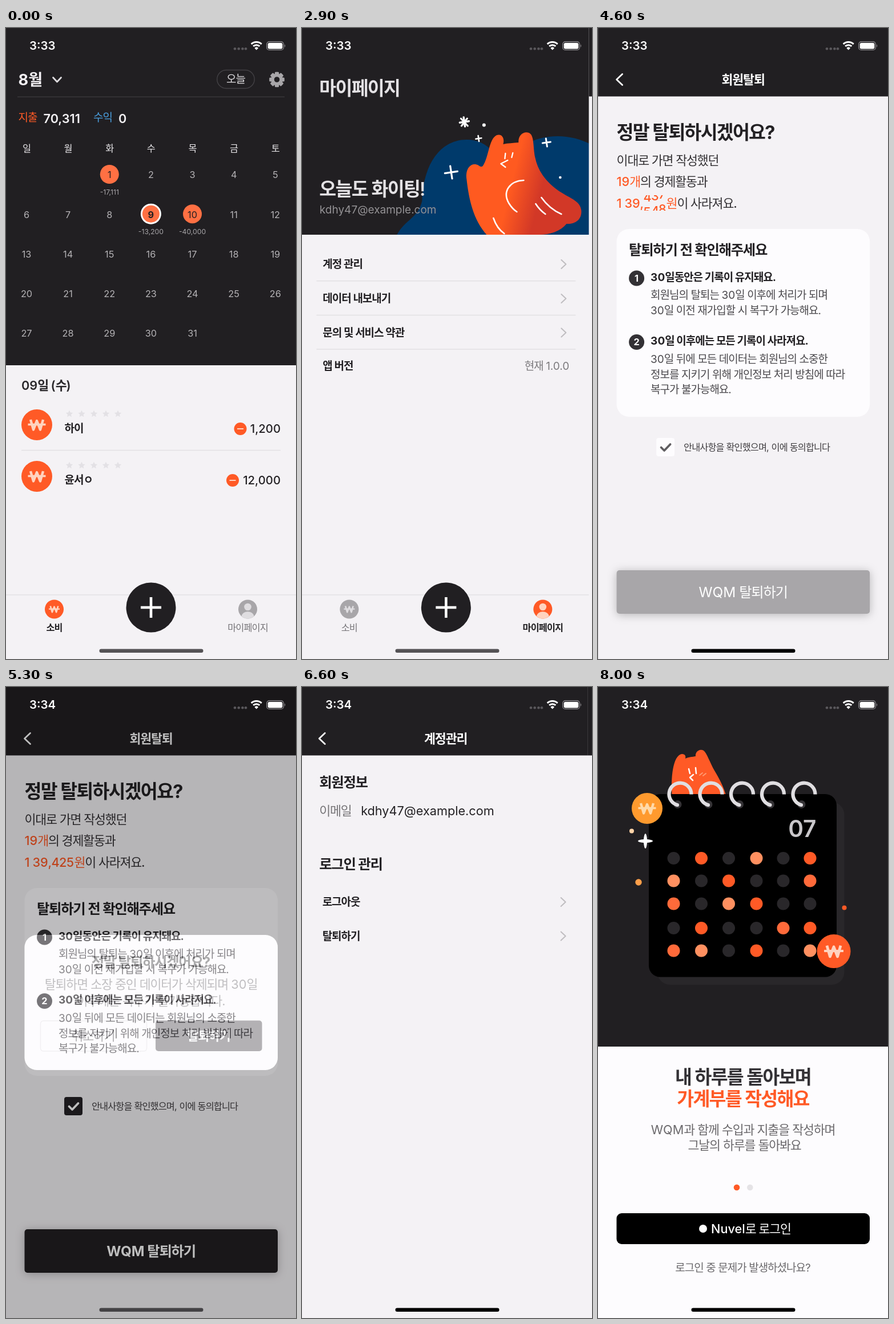
An HTML page for the animation above (8100 ms loop, 508x1102 px).

```html
<!DOCTYPE html>
<html lang="ko">
<head>
<meta charset="utf-8">
<title>가계부</title>
<style>
html, body { margin: 0; width: 100%; height: 100%; overflow: hidden; background: #211f22; }
svg { display: block; width: 100%; height: 100%; }
text { font-family: Inter, "Noto Sans CJK KR", sans-serif; word-spacing: -.042em; }
.k { letter-spacing: -.054em; }
.raised { filter: drop-shadow(0 2px 8px rgba(0, 0, 0, .25)); }
.line { fill: none; stroke-linecap: round; stroke-linejoin: round; }
</style>
</head>
<body>
<svg id="stage" viewBox="0 0 508 1102" xmlns="http://www.w3.org/2000/svg"></svg>
<script>
const LOOP = 8.1, W = 508, H = 1102;
const DARK = '#211f22', PAPER = '#f4f2f5', CARD = '#fdfcfe', ORANGE = '#ff5a26', PEACH = '#ffd3bf';
const GRAY = '#a8a6a9', RULE = '#e1dfe2', INK = '#232124', BODY = '#4b494d', LEAD = '#343235';
const EMAIL = 'kdhy47@example.com', APP = 'WQM';
// type scale
const XS = 12.2, S = 16.3, M = 19, L = 21.7, XL = 24.4, XXL = 32.5;

const each = (list, fn) => list.map(fn).join('');

// Text is placed by its vertical centre; Hangul is set a little tighter than Latin.
function text(x, cy, str, size, fill = INK, weight = 400, anchor = 'start') {
  const body = str.replace(/[가-힣ㄱ-ㅎ]+/g, '<tspan class="k">$&</tspan>');
  return `<text x="${x}" y="${cy + size * .365}" font-size="${size}" fill="${fill}" font-weight="${weight}" text-anchor="${anchor}">${body}</text>`;
}
const mid = (x, cy, str, size, fill, weight) => text(x, cy, str, size, fill, weight, 'middle');
const end = (x, cy, str, size, fill, weight) => text(x, cy, str, size, fill, weight, 'end');
const rect = (x, y, w, h, fill, rx = 0, extra = '') =>
  `<rect x="${x}" y="${y}" width="${w}" height="${h}" rx="${rx}" fill="${fill}" ${extra}/>`;
const circle = (x, y, r, fill) => `<circle cx="${x}" cy="${y}" r="${r}" fill="${fill}"/>`;
const line = (d, stroke, width) => `<path class="line" d="${d}" stroke="${stroke}" stroke-width="${width}"/>`;
const rule = (x1, x2, y, color = RULE) => rect(x1, y - .7, x2 - x1, 1.4, color);
const chevron = (x, y) => line(`M${x - 4} ${y - 7.5}l8 7.5l-8 7.5`, '#bfbdc0', 2);
const screen = (id, body) => `<g id="${id}">${body}${rect(0, 0, W, H, '#000', 0, 'class="dim" opacity="0"')}</g>`;
const highlight = (id, y) => rect(0, y, W, 60, '#dcdbde', 0, `id="${id}" opacity="0"`);

function coin(x, y, r, fill = ORANGE, ink = PEACH) {
  return circle(x, y, r, fill) + `<g transform="translate(${x} ${y}) scale(${r / 27})" fill="none" stroke="${ink}" stroke-linejoin="round">
    <path d="M-11-9L-6 8.5L0-7L6 8.5L11-9" stroke-width="4.4"/><path d="M-15.5-.5H15.5" stroke-width="3.6"/></g>`;
}

function person(x, y, fill, ink) {
  return `<g transform="translate(${x} ${y})">${circle(0, 0, 16.5, fill)}${circle(0, -4, 6.3, ink)}
    <path d="M-11 12.3C-9 1.5 9 1.5 11 12.3A16.5 16.5 0 0 1-11 12.3Z" fill="${ink}"/></g>`;
}

function star(x, y, r) {
  const points = Array.from({ length: 10 }, (_, i) => {
    const a = i * Math.PI / 5, k = i % 2 ? r * .48 : r;
    return `${x + k * Math.sin(a)},${y - k * Math.cos(a)}`;
  });
  return `<polygon points="${points.join(' ')}" fill="#e3e1e5"/>`;
}

function tabs(home) {
  const label = on => [on ? INK : '#777579', on ? 700 : 400];
  return rule(0, W, 990, '#e3e1e4')
    + coin(84.5, 1015, 16.5, home ? ORANGE : GRAY, home ? PEACH : '#dfdde0')
    + mid(84.5, 1047, '소비', S, ...label(home))
    + person(423.5, 1015, home ? GRAY : ORANGE, home ? '#dfdde0' : PEACH)
    + mid(423.5, 1047, '마이페이지', S, ...label(!home))
    + circle(254, 1012, 43.5, DARK) + rect(236, 1009.7, 36, 4.6, '#fff') + rect(251.7, 994, 4.6, 36, '#fff');
}

const page = title => rect(0, 0, W, H, PAPER) + rect(0, 0, W, 119.5, DARK)
  + line('M42.5 80.5L32.5 90L42.5 99.5', '#fff', 2.8) + mid(254, 90, title, L, '#fff', 700);

const bigButton = (fill, label, weight) =>
  rect(32.5, 947, 443.5, 76, fill, 5, 'class="raised"') + mid(254, 985, label, XL, '#fff', weight);

function calendar() {
  const colX = i => 36 + 72.63 * i;
  const spent = { 1: '-17,111', 9: '-13,200', 10: '-40,000' };
  const days = each(Array.from({ length: 31 }, (_, i) => i + 1), d => {
    const x = colX((d + 1) % 7), y = 256.5 + 69.2 * Math.floor((d + 1) / 7);
    let s = '';
    if (d === 9) s += circle(x, y - 1, 18, '#fff') + circle(x, y - 1, 15, '#ff7043');
    else if (spent[d]) s += circle(x, y - 1, 16.5, '#ff7043');
    s += mid(x, y, `${d}`, S, spent[d] ? DARK : '#b5b3b6', d === 9 ? 700 : 400);
    return s + (spent[d] ? mid(x, y + 30, spent[d], XS, GRAY) : '');
  });
  const entry = (y, name, amount, minusX) => coin(54, y, 27)
    + each([111, 132.5, 154, 175, 196], x => star(x, y - 19, 6.5))
    + text(102.5, y + 6, name, M, INK, 700)
    + circle(minusX, y + 7, 11, ORANGE) + rect(minusX - 5.5, y + 6, 11, 2, PEACH)
    + end(481, y + 7, amount, 20.3, INK, 500);
  const teeth = each([0, 45, 90, 135, 180, 225, 270, 315], a => rect(-3.6, -13.3, 7.2, 8, GRAY, 1.5, `transform="rotate(${a})"`));
  return rect(0, 0, W, H, PAPER) + rect(0, 0, W, 589, DARK)
    + text(21.5, 90, '8월', 27.1, '#f3f1f4', 700) + line('M82.5 86.5L89.5 94L96.5 86.5', '#dddbde', 2.8)
    + rect(369.7, 73.5, 65.5, 32, 'none', 16, 'stroke="#434145" stroke-width="1.4"') + mid(402.5, 89, '오늘', M, '#dddbde')
    + `<g transform="translate(474.5 90)">${teeth}<circle r="7.6" fill="none" stroke="${GRAY}" stroke-width="5.6"/></g>`
    + rule(20, 488, 120.3, '#39373b')
    + text(21.5, 156.5, '지출', M, ORANGE) + text(65.5, 158, '70,311', L, '#f3f1f4', 600)
    + text(153, 156.5, '수익', M, '#4a9fdf') + text(197, 158, '0', L, '#f3f1f4', 600)
    + each([...'일월화수목금토'], (day, i) => mid(colX(i), 210, day, S, '#e8e6e9'))
    + days + text(27, 624, '09일 (수)', L, '#2a282b', 600)
    + entry(693, '하이', '1,200', 410.5) + rule(27, 481, 737.5) + entry(783, '윤서ㅇ', '12,000', 397)
    + tabs(true);
}

function mascot() {
  const cross = (x, y, r, w) => line(`M${x - r} ${y + r * .15}L${x + r} ${y - r * .15}M${x - r * .15} ${y - r}L${x + r * .15} ${y + r}`, '#fff', w);
  return `<path d="M166 361C180 335 203 332 210 302C212 235 244 195 288 195C308 195 322 203 332 214L390 204C425 183 475 184 512 207V361Z" fill="#003a6b"/>
    <path d="M288 264C285 246 296 233 309 240C313 243 315 243 317 240C327 225 327 193 341 187C350 184 355 193 352 203C360 201 370 201 379 200C378 188 387 180 397 183C407 187 404 207 408 226C413 250 427 268 446 282C466 297 487 300 489 319C490 335 478 343 463 342C452 356 430 362 412 361H323C300 335 292 300 288 264Z" fill="url(#fur)"/>`
    + line('M388 266C364 267 350 285 362 306C367 314 371 318 376 321M409 307Q416 318 426 325M419 296C429 310 440 319 454 325M335 332Q341 350 354 359', '#fff', 2.6)
    + line('M356 219L355 228M369 218L367 226M360 231L348 237L356 243', '#fff', 2.3)
    + cross(284, 164, 8, 3.4) + line('M278 158L290 171M289 158L279 171', '#fff', 3) + circle(318.5, 169.5, 3, '#fff')
    + cross(309, 193, 5, 2.6) + cross(261, 252, 11, 3.2) + cross(428, 200, 7, 3) + circle(452, 261, 2.3, '#fff');
}

function myPage() {
  const row = (y, name) => text(38, y, name, M, INK, 700);
  return rect(0, 0, W, H, PAPER) + rect(0, 0, W, 361, DARK)
    + `<g transform="translate(2 0)">${mascot()}</g>`
    + text(32, 105, '마이페이지', XXL, '#e3e1e4', 600) + text(32, 281, '오늘도 화이팅!', XXL, '#e3e1e4', 600)
    + text(32.5, 317, EMAIL, M, '#949295')
    + highlight('hlAccount', 382) + highlight('hlExport', 442)
    + row(412.5, '계정 관리') + row(472.5, '데이터 내보내기') + row(532, '문의 및 서비스 약관') + row(590, '앱 버전')
    + each([412.5, 472.5, 532], y => chevron(460, y)) + each([441.7, 501.5, 561], y => rule(27, 481, y))
    + end(470, 590, '현재 1.0.0', M, '#7b797c') + tabs(false);
}

const exportPage = () => page('데이터 내보내기')
  + text(32.5, 182, '데이터를 엑셀 파일로', XXL, INK, 700) + text(32.5, 221, '자유롭게 사용할 수 있어요', XXL, INK, 700)
  + text(32.5, 297, '기록한 경제활동 내역의 자세한 데이터', L, LEAD) + text(32.5, 326, '를 엑셀 파일로 첨부하여 메일로 보내드려요.', L, LEAD)
  + bigButton(DARK, '데이터 내보내기', 700);

const accountPage = () => page('계정관리')
  + text(32.5, 166, '회원정보', XL, INK, 700)
  + text(32.5, 216, '이메일', L, '#757376', 500) + text(105.5, 216, EMAIL, L)
  + text(32.5, 309, '로그인 관리', XL, INK, 700)
  + highlight('hlLogout', 345) + highlight('hlLeave', 405)
  + each([['로그아웃', 375.5], ['탈퇴하기', 435]], ([name, y]) => text(38, y, name, M, INK, 700) + chevron(460, y));

function leavePage() {
  const note = (y, n, title, lines) => circle(67.5, y + 2, 13.5, '#333135') + mid(67.5, y + 2, n, S, '#fff', 700)
    + text(92, y, title, M, INK, 700) + each(lines, (s, i) => text(92, y + 31.5 + 26.7 * i, s, M, BODY));
  const check = (id, box, tick, fill, weight) => `<g id="${id}">${rect(102, 716, 32, 32, box, 4)}${line('M110.5 732.5L116 738L126.5 727', tick, 3.8)}${bigButton(fill, APP + ' 탈퇴하기', weight)}</g>`;
  return page('회원탈퇴')
    + text(32.5, 182, '정말 탈퇴하시겠어요?', XXL, INK, 700)
    + text(32.5, 231, '이대로 가면 작성했던', L, LEAD, 500)
    + text(32.5, 268, `<tspan fill="${ORANGE}">19개</tspan>의 경제활동과`, L, LEAD, 500)
    + '<g id="roll" clip-path="url(#rollWindow)"></g>'
    + text(119.5, 306, `<tspan fill="${ORANGE}">원</tspan>이 사라져요.`, L, LEAD, 500)
    + rect(32.5, 351, 443.5, 328, CARD, 21.7)
    + text(54, 387, '탈퇴하기 전 확인해주세요', XL, INK, 700)
    + note(435, '1', '30일동안은 기록이 유지돼요.', ['회원님의 탈퇴는 30일 이후에 처리가 되며', '30일 이전 재가입할 시 복구가 가능해요.'])
    + note(546.5, '2', '30일 이후에는 모든 기록이 사라져요.', ['30일 뒤에 모든 데이터는 회원님의 소중한', '정보를 지키기 위해 개인정보 처리 방침에 따라', '복구가 불가능해요.'])
    + check('unchecked', CARD, '#5f5d60', GRAY, 400) + check('checked', '#242226', '#fff', DARK, 700)
    + text(150, 732, '안내사항을 확인했으며, 이에 동의합니다', S, '#403e41');
}

// The backdrop leaves the card area clear, so the page shows through while the card fades.
const dialog = (id, title, lines, action) => `<g id="${id}">
  <path class="shade" fill-rule="evenodd" d="M0 0H508V1102H0ZM54.2 433H454.3A21.7 21.7 0 0 1 476 454.7V647.3A21.7 21.7 0 0 1 454.3 669H54.2A21.7 21.7 0 0 1 32.5 647.3V454.7A21.7 21.7 0 0 1 54.2 433Z"/>
  <g class="card">${rect(32.5, 433, 443.5, 236, CARD, 21.7)}${mid(254, 480, title, XL, '#111', 700)}
  ${mid(254, 519, lines[0], L, BODY)}${mid(254, 548, lines[1], L, BODY)}
  ${rect(60.5, 583, 186, 53, CARD, 5, 'stroke="#dddbde" stroke-width="1.4"')}${mid(153, 609, '취소하기', L)}
  ${rect(262, 582.5, 186.5, 53.5, '#242226', 5)}${mid(355, 609, action, L, '#fff', 700)}</g></g>`;

function welcome() {
  const palette = { d: '#29272a', o: ORANGE, m: '#ff6a3a', l: '#ff9060' };
  const cols = [132.5, 181, 229, 277.5, 324.5, 371.5], rows = [299, 338.5, 378.5, 421, 460.5];
  const dots = each(['dodldo', 'ldoddm', 'mdlodd', 'doddmo', 'mldodl'], (row, j) =>
    each([...row], (c, i) => circle(cols[i], rows[j], 11, palette[c])));
  const rings = each([144, 198, 252.5, 306.5, 361], x => circle(x - 4.5, 205, 7, '#353336')
    + `<path d="M${x + 19.5} 187.5A19.5 19.5 0 1 0 ${x - 5} 206" fill="none" stroke="#e0dee1" stroke-width="6.2"/>` + circle(x - 5, 206, 3.1, '#e0dee1'));
  return rect(0, 0, W, H, CARD) + rect(0, 0, W, 628, DARK)
    + rect(104, 201, 327.5, 319, '#29272a', 22)
    + `<path d="M130 192C127 160 131 119 147 117C153 117 154 121 153 125C159 122 166 122 171 121C170 113 178 107 185 111C191 116 196 132 204 146C213 161 220 174 225 192Z" fill="${ORANGE}"/>`
    + line('M159 143L161 151M171 141L172 151M167 153L161 158L166 163', '#fff', 2.5) + line('M178 154L183 150M184 155L189 151', '#ff9a72', 2)
    + rect(89, 187, 329, 319.5, '#000', 20) + rings + end(382.5, 247, '07', 40.6, '#c9c7ca', 600) + dots
    + coin(86, 212, 27, '#ff9a2e', '#ffd9a8') + coin(413, 461.5, 29.5)
    + circle(59, 251.5, 4, '#ffd3a8') + circle(71, 341, 5.7, '#ff9f4a') + circle(431.5, 385.5, 4, ORANGE)
    + '<path d="M83 256Q85 256 86 266Q96 267 96 269Q96 271 86 272Q85 282 83 282Q81 282 80 272Q70 271 70 269Q70 267 80 266Q81 256 83 256Z" fill="#fff"/>'
    + mid(254, 681, '내 하루를 돌아보며', XXL, '#333135', 700) + mid(254, 719.5, '가계부를 작성해요', XXL, ORANGE, 700)
    + mid(254, 773.5, APP + '과 함께 수입과 지출을 작성하며', L, '#6b696c') + mid(256.5, 800, '그날의 하루를 돌아봐요', L, '#6b696c')
    + circle(243, 874, 5.3, ORANGE) + circle(266.3, 874, 5.3, '#e5e3e6')
    + rect(32.5, 919, 443.5, 54, '#000', 9) + circle(184, 946, 7, '#fff') + text(198, 946, 'Nuvel로 로그인', L, '#fff', 500)
    + mid(254, 1014, '로그인 중 문제가 발생하셨나요?', M, '#6b696c');
}

const statusBar = () => `<g id="status"><g id="clock"></g>${each([401, 407.7, 414.4, 420], x => circle(x, 36.3, 2.3, '#5a585c'))}
  <g transform="translate(438.7 38.5)"><path d="M0 0L-3.4-3.6A5 5 0 0 1 3.4-3.6Z" fill="#fff"/>
  <path d="M-5.6-6.6A8.2 8.2 0 0 1 5.6-6.6M-9-10.4A13.2 13.2 0 0 1 9-10.4" fill="none" stroke="#fff" stroke-width="3"/></g>
  ${rect(456.7, 24, 29.6, 14.4, 'none', 4.4, 'stroke="#8c8a8e" stroke-width="1.3"')}${rect(458.7, 26, 25.6, 10.4, '#fff', 2.6)}
  <path d="M488 28.6Q490.4 31.2 488 33.8Z" fill="#8c8a8e"/></g>`;

const stage = document.getElementById('stage');
stage.innerHTML = `<defs><linearGradient id="fur" gradientUnits="userSpaceOnUse" x1="350" y1="270" x2="430" y2="290">
  <stop offset=".2" stop-color="#ff5a20"/><stop offset=".85" stop-color="#d23827"/></linearGradient>
  <clipPath id="rollWindow"><rect x="30" y="292" width="90" height="27"/></clipPath></defs>`
  + screen('home', calendar()) + screen('my', myPage()) + screen('exports', exportPage())
  + screen('account', accountPage()) + screen('leave', leavePage())
  + dialog('askLeave', '정말 탈퇴하시겠어요?', ['탈퇴하면 소장 중인 데이터가 삭제되며 30일', '이후에는 복구가 불가능합니다.'], '탈퇴하기')
  + dialog('askLogout', '로그아웃 하시겠어요?', ['로그아웃해도 해당 계정의 데이터는', '계속 저장되어 있습니다.'], '로그아웃')
  + screen('welcome', welcome()) + statusBar() + rect(163.5, 1084.5, 182, 6.6, '#000', 3.3, 'id="indicator"');

const $ = id => document.getElementById(id);
const show = (id, on) => $(id).setAttribute('display', on ? 'inline' : 'none');
const fade = (id, v) => $(id).setAttribute('opacity', v);
const ramp = (t, a, b) => Math.min(1, Math.max(0, (t - a) / (b - a)));
const between = (t, a, b) => t >= a && t < b;
const spring = t => t <= 0 ? 0 : 1 - (1 + 13.6 * t) * Math.exp(-13.6 * t);

// enter: how far a screen has slid in; covered: how far the next screen lies over it
function place(id, enter, covered) {
  show(id, enter > .0005 && covered < .9995);
  $(id).setAttribute('transform', `translate(${W * (1 - enter) - .3 * W * covered} 0)`);
  $(id).querySelector('.dim').setAttribute('opacity', .1 * covered);
}

function setDialog(id, p) {
  show(id, p > 0);
  $(id).querySelector('.shade').setAttribute('opacity', .76 * p);
  $(id).querySelector('.card').setAttribute('opacity', p);
}

// Each digit rolls down eleven values a second and stops 0.1 s after the one before.
function rollDigits(t) {
  const left = [32.5, 46.5, 60, 79.5, 93, 106], pitch = 26;
  const glyph = (x, y, n) => text(x, y, `${n % 10}`, L, ORANGE, 500);
  $('roll').innerHTML = text(73.5, 306, ',', L, ORANGE, 500) + each([1, 3, 9, 4, 2, 5], (digit, i) => {
    const value = digit + Math.max(0, 4.338 + .1 * i - Math.max(t, 4.05)) * 11;
    const n = Math.floor(value), part = value - n;
    return glyph(left[i], 306 - pitch * part, n) + (part > 0 ? glyph(left[i], 306 + pitch * (1 - part), n + 1) : '');
  });
}

function indicatorColor(t) {
  if (t < 4) return '#545255';
  if (between(t, 5.3, 6)) return '#444245';
  return between(t, 6.9, 7.45) ? '#494749' : '#000';
}

function render(t) {
  const exp = spring(t - 1.581) - spring(t - 2.42);
  const acc = spring(t - 3.05);
  const leave = spring(t - 3.8) - spring(t - 6.15);
  show('home', t < .7);
  place('my', t >= .7 ? 1 : 0, Math.min(1, exp + acc));
  place('exports', exp, 0);
  place('account', acc, leave);
  place('leave', leave, 0);

  fade('hlExport', t >= 1.45 ? 1 - ramp(t, 2.42, 2.8) : 0);
  fade('hlAccount', t >= 2.97 ? 1 : 0);
  fade('hlLeave', t >= 3.67 ? 1 - ramp(t, 6.15, 6.5) : 0);
  fade('hlLogout', t >= 6.67 ? 1 - ramp(t, 6.8, 7.1) : 0);

  rollDigits(t);
  show('unchecked', t < 5);
  show('checked', t >= 5);
  setDialog('askLeave', ramp(t, 5.2, 5.5) - ramp(t, 5.8, 6.094));
  setDialog('askLogout', ramp(t, 6.8, 7.1) - ramp(t, 7.25, 7.5));
  show('welcome', t > 7.4);
  fade('welcome', ramp(t, 7.4, 7.7));

  show('status', !between(t, 1.55, 2.05) && !between(t, 3.05, 3.45));
  $('clock').innerHTML = text(41, 31, t < 5 ? '3:33' : '3:34', 20.4, '#fff', 600);
  $('indicator').setAttribute('fill', indicatorColor(t));
}

const start = performance.now();
function tick() {
  render((performance.now() - start) / 1000 % LOOP);
  requestAnimationFrame(tick);
}
tick();
</script>
</body>
</html>
```
